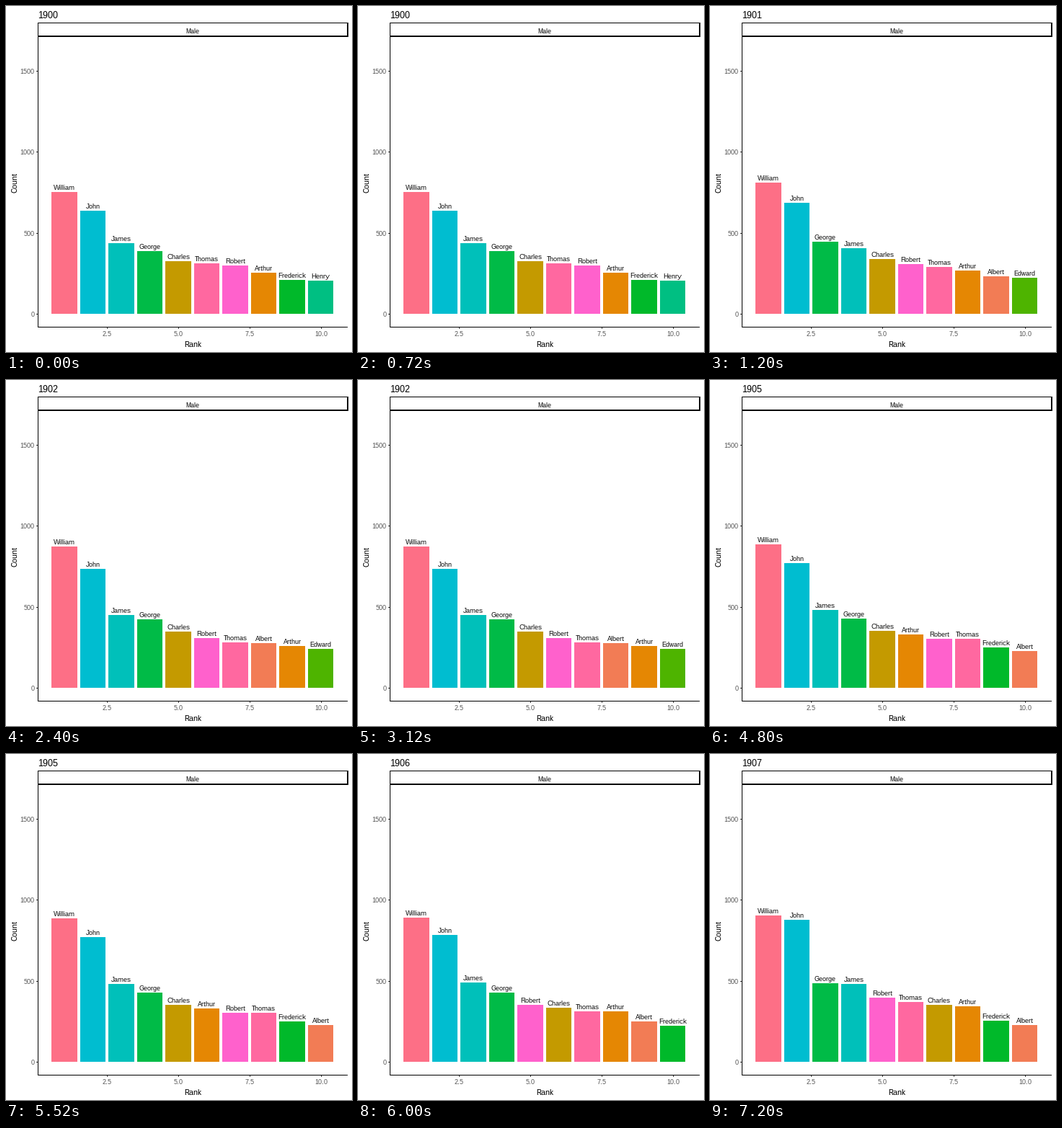
Write a matplotlib script that moves like this. It is 480x480 px and loops after 8000 ms.

```python
import math

import matplotlib.pyplot as plt
import numpy as np
from matplotlib.animation import FuncAnimation
from matplotlib.patches import Rectangle

SIZE, DPI = 480, 100
STEP_MS, STEPS, HOLD = 400, 20, 3
RANKS = range(1, 11)

LINEUPS = {
    1900: "William John James George Charles Thomas Robert Arthur Frederick Henry",
    1901: "William John George James Charles Robert Thomas Arthur Albert Edward",
    1902: "William John James George Charles Robert Thomas Albert Arthur Edward",
    1904: "William John James George Thomas Charles Robert Arthur Albert Frederick",
    1905: "William John James George Charles Arthur Robert Thomas Frederick Albert",
    1906: "William John James George Robert Charles Thomas Arthur Albert Frederick",
    1907: "William John George James Robert Thomas Charles Arthur Frederick Albert",
}

# counts by rank in the key years; the years between are interpolated
KEY_COUNTS = {
    1900: (753, 638, 438, 389, 327, 313, 300, 256, 211, 207),
    1902: (873, 736, 451, 424, 349, 309, 282, 278, 260, 242),
    1906: (891, 784, 491, 429, 353, 336, 313, 313, 251, 224),
    1907: (904, 878, 487, 482, 398, 371, 353, 344, 256, 229),
}

HUES = dict(William=5, John=202, James=189, George=139, Charles=66.4, Thomas=353,
            Robert=330, Arthur=38.6, Frederick=132, Henry=161, Albert=23.5, Edward=119)

# whole-pixel glyph fitting
plt.rcParams.update({
    "font.family": "Liberation Sans",
    "text.hinting": "native",
    "text.hinting_factor": 1,
})
fig = plt.figure(figsize=(SIZE / DPI, SIZE / DPI), dpi=DPI, facecolor="white")
ax = fig.add_axes([0, 0, 1, 1])
ax.set_xlim(0, SIZE)
ax.set_ylim(SIZE, 0)
ax.axis("off")


def hue_color(hue, chroma=100, light=65):
    """Polar CIE-LUV colour as clipped sRGB."""
    angle = math.radians(hue)
    u = chroma * math.cos(angle) / (13 * light) + 0.1978
    v = chroma * math.sin(angle) / (13 * light) + 0.4683
    y = ((light + 16) / 116) ** 3
    x = y * 9 * u / (4 * v)
    z = y * (12 - 3 * u - 20 * v) / (4 * v)
    linear = np.clip([3.2406 * x - 1.5372 * y - 0.4986 * z,
                      -0.9689 * x + 1.8758 * y + 0.0415 * z,
                      0.0557 * x - 0.2040 * y + 1.0570 * z], 0, 1)
    return np.where(linear > 0.0031308,
                    1.055 * linear ** (1 / 2.4) - 0.055, 12.92 * linear)


def counts_in(year):
    return [np.interp(year, list(KEY_COUNTS), track)
            for track in zip(*KEY_COUNTS.values())]


def x_pos(rank):
    return 81 + 39.5 * (rank - 1)


def y_pos(count):
    return 427.5 - 0.225 * count


def box(x0, y0, x1, y1, color):
    return ax.add_patch(Rectangle((x0, y0), x1 - x0, y1 - y0, fc=color, lw=0))


def label(x, y, text, px, color="black", ha="center", **kw):
    return ax.text(x, y, text, fontsize=px * 72 / DPI, color=color,
                   ha=ha, va="baseline", **kw)


def draw_frame():
    # facet strip, thinner on its clipped top and left sides
    box(44, 23, 475, 43, "black")
    box(45, 24, 473, 41, "white")
    label(258.5, 38, "Male", 9)
    # axis lines and ticks
    box(44, 42, 45, 446, "black")
    box(44, 445, 474, 446, "black")
    for count in range(0, 1501, 500):
        y = int(y_pos(count))
        box(42, y, 44, y + 1, "#333333")
        label(39.5, y + 4, str(count), 9, "#4D4D4D", "right")
    for rank in np.arange(2.5, 10.1, 2.5):
        x = int(x_pos(rank) + 0.5)
        box(x, 446, x + 1, 448, "#333333")
        label(x + 0.5, 458, str(rank), 9, "#4D4D4D")
    label(259, 473, "Rank", 11)
    label(15, 245, "Count", 11, rotation=90, rotation_mode="anchor")


draw_frame()
colors = {name: hue_color(hue) for name, hue in HUES.items()}
title = label(44, 17, "", 13, ha="left")
bars = [box(round(x_pos(r) - 17.8), 427, round(x_pos(r) + 17.8), 427, "white")
        for r in RANKS]
tags = [label(x_pos(r), 0, "", 9) for r in RANKS]


def update(step):
    year = list(LINEUPS)[step // HOLD]
    title.set_text(str(year))
    rows = zip(bars, tags, LINEUPS[year].split(), counts_in(year))
    for bar, tag, name, count in rows:
        top = round(y_pos(count))
        bar.set_y(top)
        bar.set_height(427 - top)
        bar.set_facecolor(colors[name])
        tag.set_text(name)
        tag.set_y(top - 3)
    return [title, *bars, *tags]


anim = FuncAnimation(fig, update, frames=STEPS, interval=STEP_MS,
                     repeat=True, repeat_delay=0)
plt.show()
```
